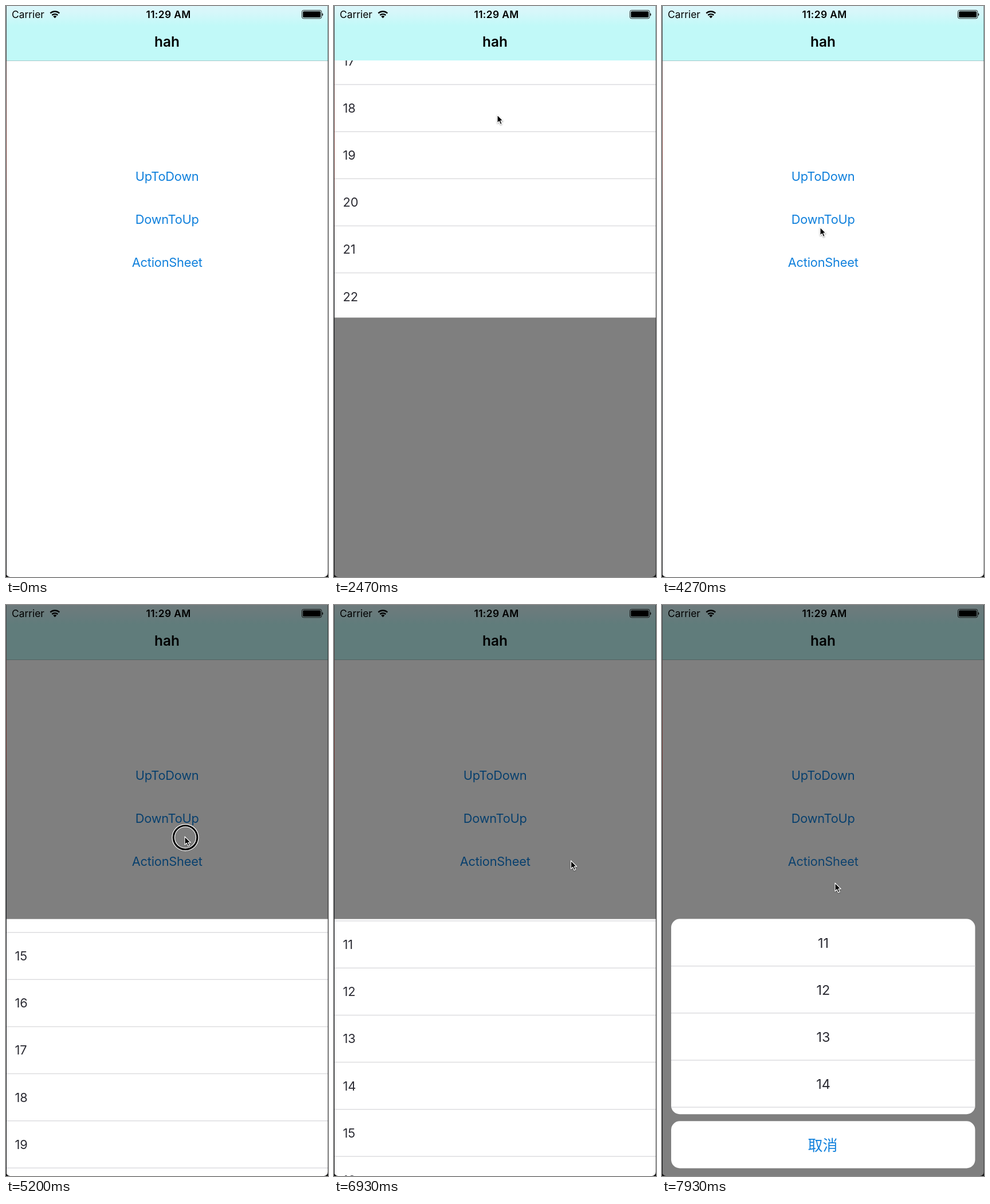
Recreate the animation shown at these times as an HTML page. Size 562 by 996 pixels, loop 8000 ms.

```html
<!DOCTYPE html>
<html lang="en">
<head>
<meta charset="utf-8">
<title>Popup menus</title>
<style>
  html, body { margin: 0; width: 100%; height: 100%; overflow: hidden; background: #fff; }
  #stage { display: block; width: 100vw; height: 100vh; }
  text { font-family: Inter, "Noto Sans CJK SC", "Noto Sans CJK", sans-serif; }
  .status { font-size: 17.4px; }
  .clock { font-weight: 600; letter-spacing: .02em; }
  .title { font-size: 24.4px; font-weight: 600; }
  .button { font-size: 21.8px; letter-spacing: -.01em; fill: #1080dc; }
  .row { font-size: 21.8px; fill: #2b2b33; }
  .choice { font-size: 23.5px; fill: #2b2b33; }
  .cancel { font-size: 26px; fill: #1080dc; }
  .middle { text-anchor: middle; }
  .rule { stroke: #dddde0; stroke-width: 1.5; }
</style>
</head>
<body>
<svg id="stage" viewBox="0 0 562 996" preserveAspectRatio="none">
  <defs>
    <linearGradient id="barFill" x1="0" y1="0" x2="0" y2="1">
      <stop offset="0" stop-color="#dcf6fa"/>
      <stop offset=".12" stop-color="#d6f7fa"/>
      <stop offset=".36" stop-color="#c1f9f8"/>
    </linearGradient>
    <linearGradient id="edgeFill" x1="0" y1="0" x2="0" y2="1">
      <stop offset="0" stop-color="#40484c"/>
      <stop offset=".25" stop-color="#6a2e28"/>
      <stop offset=".42" stop-color="#1c1e22"/>
      <stop offset="1" stop-color="#0c0c0e"/>
    </linearGradient>
  </defs>

  <rect width="562" height="996" fill="#fff"/>
  <rect width="562" height="95.5" fill="url(#barFill)"/>
  <path d="M0 95.5H562" stroke="#a6c9ca"/>
  <text class="status" x="10" y="21">Carrier</text>
  <g fill="none" stroke="#000" stroke-width="2.4">
    <path d="M77.3 12.6A12 12 0 0 1 93.3 12.6"/>
    <path d="M80.3 16A7.5 7.5 0 0 1 90.3 16"/>
  </g>
  <path d="M85.3 21.2L82.3 18.2A4.3 4.3 0 0 1 88.3 18.2Z"/>
  <text class="status clock middle" x="283.5" y="21">11:29 AM</text>
  <rect x="516.5" y="7.5" width="34.3" height="14.3" rx="2.8" fill="none" stroke="#222"/>
  <rect x="518.2" y="9.2" width="30.9" height="10.9" rx="1.5"/>
  <path d="M551.8 12.2q1.6 .6 1.6 2.6t-1.6 2.6z"/>
  <text class="title middle" x="281" y="71">hah</text>
  <g id="buttons"></g>

  <rect id="lowerDim" y="95" width="562" height="901"/>
  <rect id="fullDim" width="562" height="996"/>
  <svg id="topList" y="95" width="562" height="448.5"></svg>
  <svg id="bottomList" width="562" height="448.5"></svg>

  <g id="sheet">
    <rect x="16" y="547.5" width="530.5" height="340.7" rx="15" fill="#fff"/>
    <g id="choices"></g>
    <rect x="16" y="900.3" width="530.5" height="82.2" rx="15" fill="#fff"/>
    <text class="cancel middle" x="280.5" y="951.5">取消</text>
  </g>

  <rect width="1" height="996" fill="url(#edgeFill)"/>
  <path d="M561.5 0V996" stroke="#000" stroke-opacity=".42"/>
  <path d="M0 989V996H7Q1 995 0 989ZM562 989V996H555Q561 995 562 989Z" fill="#111"/>

  <g id="cursor">
    <g id="ring" fill="none">
      <circle cx="1" cy="1.5" r="20.8" stroke="#fff" stroke-width="5.6"/>
      <circle cx="1" cy="1.5" r="20.8" stroke="#000" stroke-width="3.2"/>
    </g>
    <path d="M0 0V14.2L3.3 11.2L5.6 16.6L8.2 15.5L5.9 10.2H10.3Z"
          stroke="#fff" stroke-width="1.2" stroke-linejoin="round"
          style="filter:drop-shadow(0 1px 1px rgba(0,0,0,.35))"/>
  </g>
</svg>
<script>
const LOOP = 8000, ROW = 82.15, ROWS = 13, LIST_HEIGHT = 448.5;
const MAX_SCROLL = ROWS * ROW - LIST_HEIGHT + 2;
const FLING_MS = 580;

const el = id => document.getElementById(id);
const show = (id, alpha) => el(id).setAttribute('opacity', alpha);
const move = (node, x, y) => node.setAttribute('transform', `translate(${x} ${y})`);
const mix = (a, b, p) => a + (b - a) * p;
const ramp = (t, start, ms) => Math.min(1, Math.max(0, (t - start) / ms));
const smooth = p => p * p * (3 - 2 * p);
const overshoot = p => 1 + 2.7 * (p - 1) ** 3 + 1.7 * (p - 1) ** 2;

// Everything on screen follows from these touches.
const drag = (at, x, y, dy, ms) => ({ at, x, y, dy, end: at + ms });
const tap = (at, x, y) => drag(at, x, y, 0, 85);

const openTop = tap(1410, 260, 304);
const scrollTop = drag(2050, 285, 490, -300, 300);
const closeTop = tap(3560, 283.5, 353.5);
const openBottom = tap(4420, 276, 386);
const scrollDown = drag(4900, 312, 709, -308, 304);
const scrollBack = drag(6120, 375, 600, 280, 280);
const closeBottom = tap(7020, 413.5, 446);
const openSheet = tap(7470, 300, 450);
const touches = [
  tap(-85, -14, 420), openTop, scrollTop, closeTop, openBottom,
  scrollDown, scrollBack, closeBottom, openSheet, tap(LOOP, 302, 485)
];

// The cursor follows a touch, then rests, glides and waits for the next one.
function cursorAt(t) {
  const i = touches.findIndex(touch => touch.at > t);
  const last = touches[i - 1], next = touches[i], gap = next.at - last.end;
  const y = last.y + last.dy * ramp(t, last.at, last.end - last.at);
  const p = smooth(ramp(t, last.end + gap * .2, gap * .55));
  return [mix(last.x, next.x, p), mix(y, next.y, p)];
}

// A drag moves the list with the finger; the fling then carries it to its end.
function scrolled(t, drags) {
  let offset = 0;
  for (const { at, end, dy } of drags) {
    if (t < at) break;
    const held = offset - dy * ramp(t, at, end - at);
    const rest = dy < 0 ? MAX_SCROLL : 0;
    offset = mix(held, rest, t > end ? overshoot(ramp(t, end, FLING_MS)) : 0);
  }
  return offset;
}

const shown = (t, start, stop, ms) => ramp(t, start, ms) - ramp(t, stop, ms);
const buttonAlpha = (t, touch) => t < touch.at ? 1 : mix(.2, 1, ramp(t, touch.end, 400));

const repeat = (count, make) => Array.from({ length: count }, (_, i) => make(i)).join('');

const buttons = [['UpToDown', openTop], ['DownToUp', openBottom], ['ActionSheet', openSheet]];
el('buttons').innerHTML = repeat(buttons.length, i =>
  `<text class="button middle" id="${buttons[i][0]}" x="281.2" y="${305.3 + 74.8 * i}">${buttons[i][0]}</text>`);

function buildList(id) {
  const rules = repeat(ROWS + 1, i => `<path class="rule" d="M0 ${i * ROW}H562"/>`);
  const labels = repeat(ROWS, i => `<text class="row" x="15.5" y="${i * ROW + 49}">${11 + i}</text>`);
  el(id).innerHTML = `<rect width="562" height="450" fill="#fff"/><g>${rules}${labels}</g>`;
  return el(id).lastChild;
}
const topRows = buildList('topList'), bottomRows = buildList('bottomList');

el('choices').innerHTML = repeat(4, i => {
  const y = 547.5 + i * ROW;
  return `<text class="choice middle" x="281.5" y="${y + 50}">${11 + i}</text>` +
    `<path class="rule" d="M16 ${y + ROW}H546.5"/>`;
});

function draw(t) {
  const rise = smooth(shown(t, openBottom.end, closeBottom.end, 290));
  const sheetRise = smooth(ramp(t, openSheet.end, 290));

  for (const [name, touch] of buttons) show(name, buttonAlpha(t, touch));
  show('lowerDim', shown(t, openTop.at + 10, closeTop.end, 230) / 2);
  show('fullDim', Math.max(rise, sheetRise) / 2);
  show('topList', shown(t, openTop.end, closeTop.end, 230));
  move(topRows, 0, .5 - scrolled(t, [scrollTop]));
  move(bottomRows, 0, -scrolled(t, [scrollDown, scrollBack]));
  el('bottomList').setAttribute('y', 996 - LIST_HEIGHT * rise);
  move(el('sheet'), 0, 450 * (1 - sheetRise));

  move(el('cursor'), ...cursorAt(t));
  show('ring', touches.some(({ at, end }) => t >= at && t < end) ? 1 : 0);
}

const start = performance.now();
function tick() {
  draw((performance.now() - start) % LOOP);
  requestAnimationFrame(tick);
}
tick();
</script>
</body>
</html>
```
